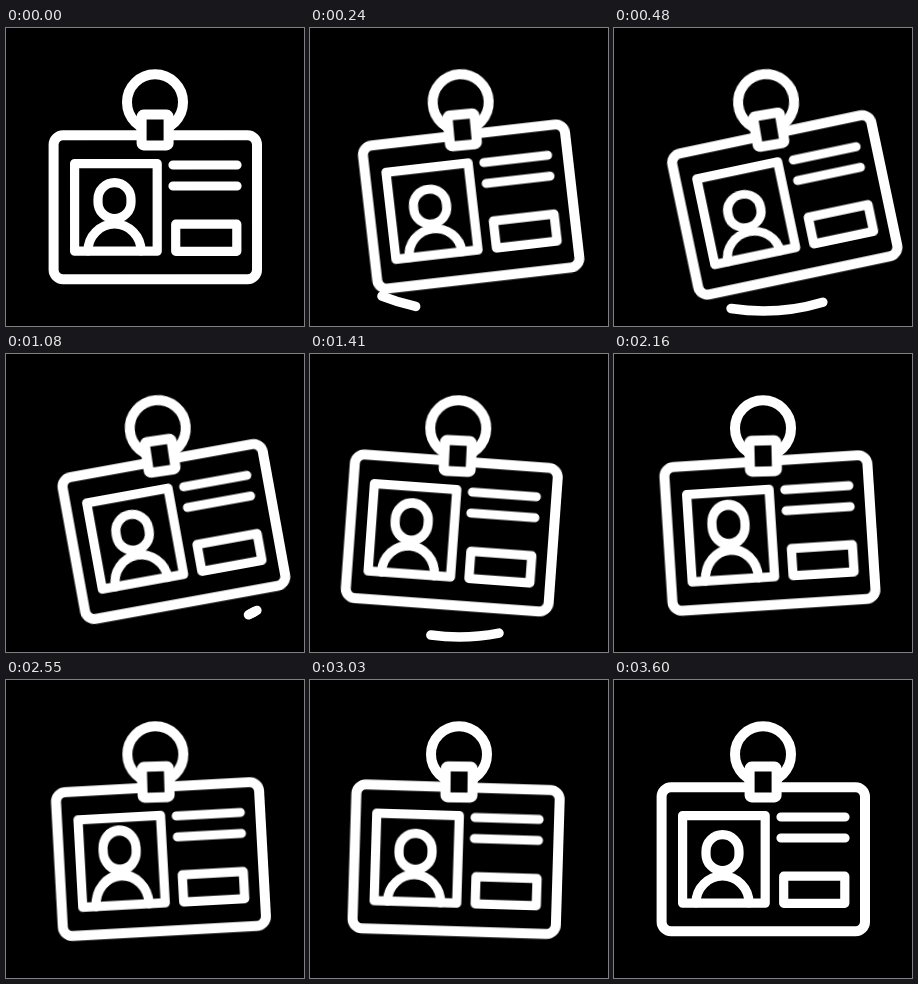
An HTML page for the animation above (5.4 s loop, 298 by 298 pixels).

```html
<!DOCTYPE html>
<html lang="en">
<head>
<meta charset="utf-8">
<title>Swinging badge</title>
<style>
  @property --head { syntax: "<length>"; inherits: false; initial-value: 0px; }
  @property --tail { syntax: "<length>"; inherits: false; initial-value: 0px; }

  :root {
    --loop: 5400ms;
    --sway: cubic-bezier(.37, 0, .63, 1);
    --push: cubic-bezier(.22, .1, .08, 1);
  }
  html, body { margin: 0; width: 100%; height: 100%; overflow: hidden; background: #000; }
  svg { display: block; width: 100%; height: 100%; }
  svg * { fill: none; stroke: #fff; stroke-linecap: round; stroke-linejoin: round; }
  .bold { stroke-width: 10; }
  .thin { stroke-width: 9.2; }
  .clip rect { fill: #000; }

  .card { --amp: 1; transform-origin: 149px 75px; animation: swing var(--loop) var(--sway) infinite; }
  .clip { --amp: .35; transform-origin: 149px 102px; animation: swing var(--loop) var(--sway) infinite; }
  .hook { transform-origin: 149px 41px; animation: hook var(--loop) var(--sway) infinite; }
  .person { transform-origin: 108px 225px; animation: squash var(--loop) var(--sway) infinite; }

  @keyframes swing {
    0% { transform: rotate(0deg); animation-timing-function: var(--push); }
    16.11% { transform: rotate(calc(var(--amp) * -14deg)); }
    31.48% { transform: rotate(calc(var(--amp) * 10.8deg)); }
    43.52% { transform: rotate(calc(var(--amp) * -7.1deg)); }
    52.22% { transform: rotate(calc(var(--amp) * 3.2deg)); }
    61.11% { transform: rotate(calc(var(--amp) * -.4deg)); }
    66.67%, 100% { transform: rotate(0deg); }
  }
  @keyframes hook {
    0% { transform: rotate(0deg); animation-timing-function: var(--push); }
    16.11% { transform: rotate(-6.3deg); }
    31.48% { transform: rotate(4deg); }
    43.52% { transform: rotate(-1deg); }
    52.22%, 100% { transform: rotate(0deg); }
  }
  @keyframes squash {
    0% { transform: scaleY(1); }
    9.5% { transform: scaleY(.92); }
    20%  { transform: scaleY(1); }
    34%, 47% { transform: scaleY(1.09); }
    56%, 100% { transform: scaleY(1); }
  }

  /* each trail is one dash running from --tail to --head */
  .trail {
    stroke-width: 9.5;
    stroke-dasharray: calc(var(--head) - var(--tail)) 999px;
    stroke-dashoffset: calc(0px - var(--tail));
  }
  .right { animation: head-r var(--loop) var(--sway) infinite, tail-r var(--loop) var(--sway) infinite, show-r var(--loop) step-end infinite; }
  .left { animation: head-l var(--loop) var(--sway) infinite, tail-l var(--loop) var(--sway) infinite, show-l var(--loop) step-end infinite; }

  @keyframes head-r { 0% { --head: 0px; } 13.05%, 100% { --head: 203px; } }
  @keyframes tail-r { 0% { --tail: 0px; } 23.33%, 100% { --tail: 203px; } }
  @keyframes show-r { 0% { opacity: 0; } .5% { opacity: 1; } 23.3%, 100% { opacity: 0; } }
  @keyframes head-l { 0%, 18.52% { --head: 0px; } 31.11%, 100% { --head: 203px; } }
  @keyframes tail-l { 0%, 18.52% { --tail: 0px; } 38.15%, 100% { --tail: 203px; } }
  @keyframes show-l { 0% { opacity: 0; } 18.6% { opacity: 1; } 38.1%, 100% { opacity: 0; } }
</style>
</head>
<body>
<svg viewBox="0 0 298 298">
  <path class="trail right" d="M56 261A208 208 0 0 0 250.8 256.4"/>
  <path class="trail left" d="M250.8 256.4A208 208 0 0 1 56 261"/>

  <g class="card">
    <rect class="bold" x="47.6" y="107.3" width="203.4" height="144" rx="9.5"/>
    <g class="thin">
      <rect x="68.6" y="135.6" width="82.6" height="87.6"/>
      <g class="person">
        <rect x="92" y="154.7" width="33" height="36" rx="16.5"/>
        <path d="M82 223a26.5 27 0 0 1 53 0"/>
      </g>
      <path d="M167 137H231M167 158H231"/>
      <rect x="169.7" y="196.2" width="61.1" height="27.1"/>
    </g>
  </g>

  <g class="hook bold">
    <circle cx="149" cy="74.3" r="28"/>
    <g class="clip"><rect x="135.6" y="86.6" width="27" height="30.8" rx="2"/></g>
  </g>
</svg>
</body>
</html>
```
